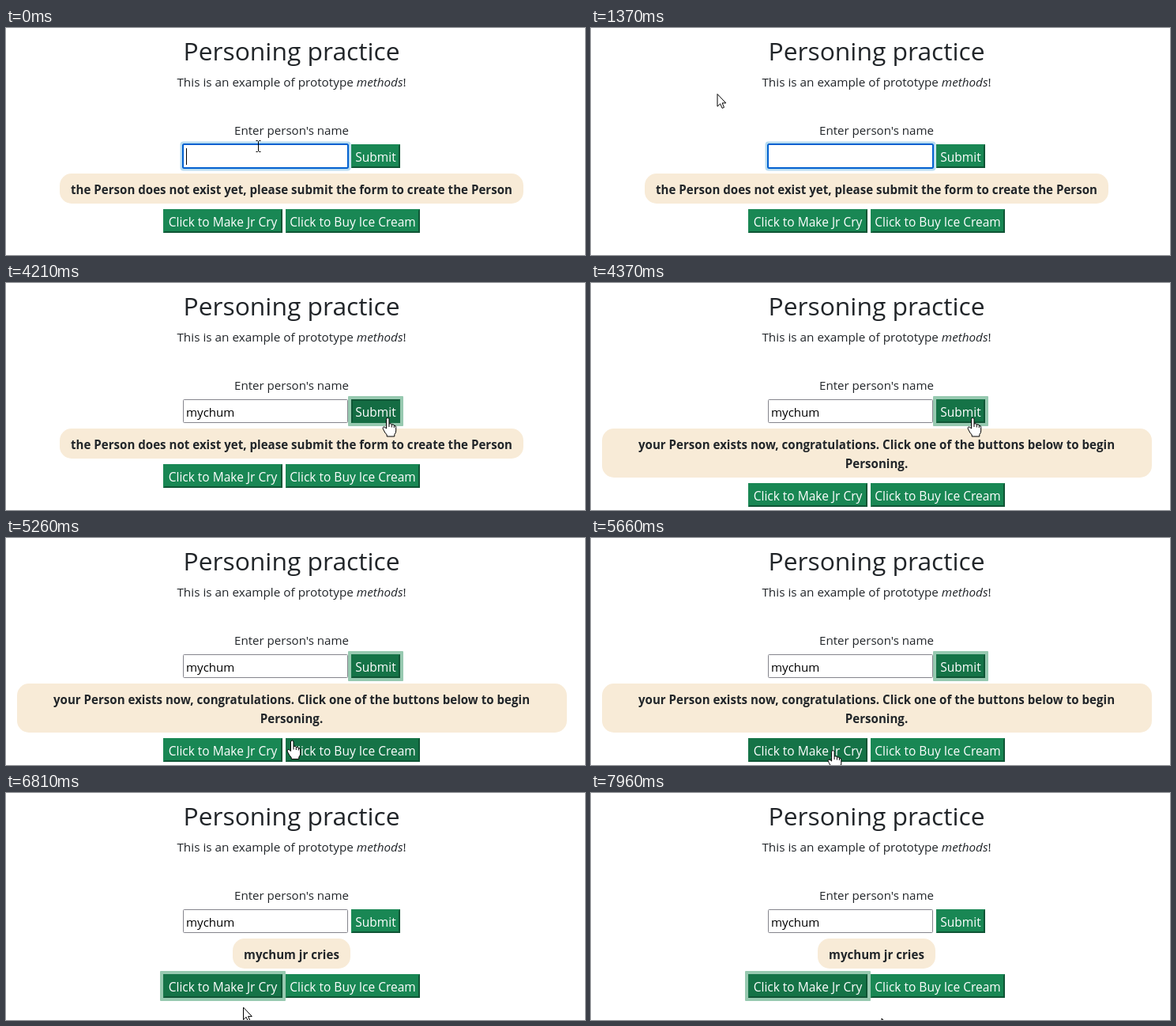
An HTML page for the animation above (8000 ms loop, 733x287 px).

```html
<!DOCTYPE html>
<html lang="en">
<head>
<meta charset="utf-8">
<title>Personing practice</title>
<style>
  html, body { margin: 0; width: 100%; height: 100%; overflow: hidden; background: #fff; }
  svg { display: block; width: 100%; height: 100%; }
  text { font: 15.1px "Open Sans", "Noto Sans", sans-serif; fill: #212529; white-space: pre; }
  .mid { text-anchor: middle; }
  .bold { font-weight: 700; }
  .btn text { font-size: 15.5px; fill: #fff; }
  .edge { fill: #0f5535; }
  .ring { fill: #97c9b0; }
  .ink { fill: none; stroke: #000; }
  .shape { fill: #fff; stroke: #000; stroke-linejoin: round; }
</style>
</head>
<body>
<svg id="stage" viewBox="0 0 733 287">
  <text class="mid" x="361.5" y="41" style="font-size:31.8px">Personing practice</text>
  <text class="mid" x="361.5" y="74" style="font-size:15.3px">This is an example of prototype <tspan font-style="italic">methods</tspan>!</text>
  <text class="mid" x="361.5" y="135">Enter person's name</text>

  <g id="focus">
    <rect x="220.5" y="143.5" width="216" height="37" rx="4" fill="#b9dcf0"/>
    <rect x="224" y="147" width="209" height="30" rx="1.5" fill="#fff" stroke="#0060d0" stroke-width="2"/>
  </g>
  <rect id="blur" x="224.5" y="147.5" width="208" height="29" rx="1" fill="#fff" stroke="#85858d"/>
  <text id="typed" x="228" y="169" style="fill:#000"></text>
  <rect id="caret" y="152" width="1" height="21"/>

  <rect id="box" y="184" rx="15" fill="#f8ebd7"/>
  <text id="line1" class="mid bold" x="361.5" y="210"></text>
  <text id="line2" class="mid bold" x="361.5" y="234"></text>

  <g id="buttons"></g>

  <g id="cursor">
    <path id="arrow" class="shape" d="M.5.5V16.2L4.1 12.8 6.6 18.4 9 17.3 6.6 11.9H11.3Z"/>
    <g id="hand">
      <path class="shape" d="M-1.5 13V1.5Q-1.5-.5.3-.5T2 1.5V7Q4.8 5.8 5.3 8Q7.8 7 8.3 9.2Q10.7 8.8 10.7 11.5V16Q10.7 18.5 8.8 20.5V23H-.8V21Q-3.3 18.5-5.2 14.5Q-6.6 12.2-5.4 11.2Q-4.1 10.3-2.8 11.8Z"/>
      <path class="ink" d="M2 7V11M5.3 8V11.5M8.3 9.2V12"/>
    </g>
    <path id="beam" class="ink" d="M-3-6.5H-1L0-5.5 1-6.5H3M0-5.5V6.5M-3 7.5H-1L0 6.5 1 7.5H3"/>
  </g>
</svg>
<script>
const LOOP = 8000, NAME = "mychum";
const SUBMIT = 4210, CREATED = 4370, PRESS = 6650, CRIED = 6810;
const KEYS = [1450, 1700, 2190, 2920, 3080, 3160];

const $ = id => document.getElementById(id);
const show = (el, on) => el.setAttribute("visibility", on ? "visible" : "hidden");
const set = (el, attrs) => { for (const k in attrs) el.setAttribute(k, attrs[k]); };
const ease = p => p * p * (3 - 2 * p);

function add(parent, tag, attrs) {
  const el = document.createElementNS("http://www.w3.org/2000/svg", tag);
  set(el, attrs);
  return parent.appendChild(el);
}

function makeButton(label, x, w) {
  const h = 30, g = add($("buttons"), "g", { class: "btn" });
  const ring = add(g, "rect", { class: "ring", x: -4, y: -4, width: w + 8, height: h + 8, rx: 1 });
  const face = add(g, "rect", { width: w, height: h });
  const low = add(g, "path", { class: "edge", d: `M0 ${h}H${w}V0l-2 2V${h - 2}H2Z` });
  const high = add(g, "path", { class: "edge", d: `M0 ${h}V0H${w}l-2 2H2V${h - 2}Z` });
  add(g, "text", { class: "mid", x: w / 2, y: 22 }).textContent = label;
  return {
    contains: (px, py, top) => px >= x && px < x + w && py >= top && py < top + h,
    draw(top, focused, hover, pressed) {
      set(g, { transform: `translate(${x} ${top})` });
      set(face, { fill: pressed ? "#146c43" : focused || hover ? "#157347" : "#198754" });
      show(ring, focused);
      show(low, !pressed);
      show(high, pressed);
    }
  };
}

const submit = makeButton("Submit", 437, 62);
const cry = makeButton("Click to Make Jr Cry", 199, 151);
const buy = makeButton("Click to Buy Ice Cream", 354, 170);

// The screen is sampled at a fixed rate
const sample = t => 60 + 81.2 * Math.floor((t - 60) / 81.2);

const glides = [
  { from: -20, to: 140, x: 159.5, y: 83 },
  { from: 3840, to: 4200, x: 483, y: 171 },
  { from: 4860, to: 5256, x: 362, y: 256.5 },
  { from: 5256, to: 5660, x: 300, y: 270.5 },
  { from: 7650, to: 7930, x: 367.5, y: 284.5 }
];

function pointer(t) {
  let x = 319.5, y = 149;
  for (const g of glides) {
    const p = ease(Math.min(1, Math.max(0, (t - g.from) / (g.to - g.from))));
    x += (g.x - x) * p;
    y += (g.y - y) * p;
  }
  return [x, y];
}

function message(t) {
  if (t < CREATED) return ["the Person does not exist yet, please submit the form to create the Person"];
  if (t < CRIED) return ["your Person exists now, congratulations. Click one of the buttons below to begin", "Personing."];
  return [NAME + " jr cries"];
}

function drawInput(t, editing) {
  show($("focus"), editing);
  show($("blur"), !editing);
  $("typed").textContent = NAME.slice(0, KEYS.filter(k => k <= t).length);
  set($("caret"), { x: 228 + Math.round($("typed").getComputedTextLength()) });
  show($("caret"), editing && Math.floor((sample(t) - 255) / 530) % 2);
}

// Returns the height of the message box
function drawMessage(t) {
  const [first, second = ""] = message(t);
  $("line1").textContent = first;
  $("line2").textContent = second;
  const width = second ? 696 : Math.round($("line1").getComputedTextLength()) + 28;
  const height = second ? 62 : 38;
  set($("box"), { x: Math.round(361.5 - width / 2), width, height });
  return height;
}

function drawCursor(x, y, height, onButton) {
  const onInput = x > 224 && x < 433 && y > 147 && y < 177;
  const onText = y > 193 && y < 176 + height;
  const onField = !onButton && (onInput || onText);
  set($("cursor"), { transform: `translate(${x} ${y})` });
  show($("hand"), onButton);
  show($("beam"), onField);
  show($("arrow"), !onButton && !onField);
}

function render(t) {
  const editing = t < SUBMIT, [x, y] = pointer(sample(t));
  drawInput(t, editing);
  const height = drawMessage(t), top = 191 + height;
  const over = [submit.contains(x, y, 147), cry.contains(x, y, top), buy.contains(x, y, top)];
  submit.draw(147, !editing && t < PRESS, over[0], !editing && t < CREATED);
  cry.draw(top, t >= PRESS, over[1], t >= PRESS && t < CRIED);
  buy.draw(top, false, over[2], false);
  drawCursor(x, y, height, over.includes(true));
}

const start = performance.now();
function tick() {
  render((performance.now() - start) % LOOP);
  requestAnimationFrame(tick);
}
tick();
</script>
</body>
</html>
```
